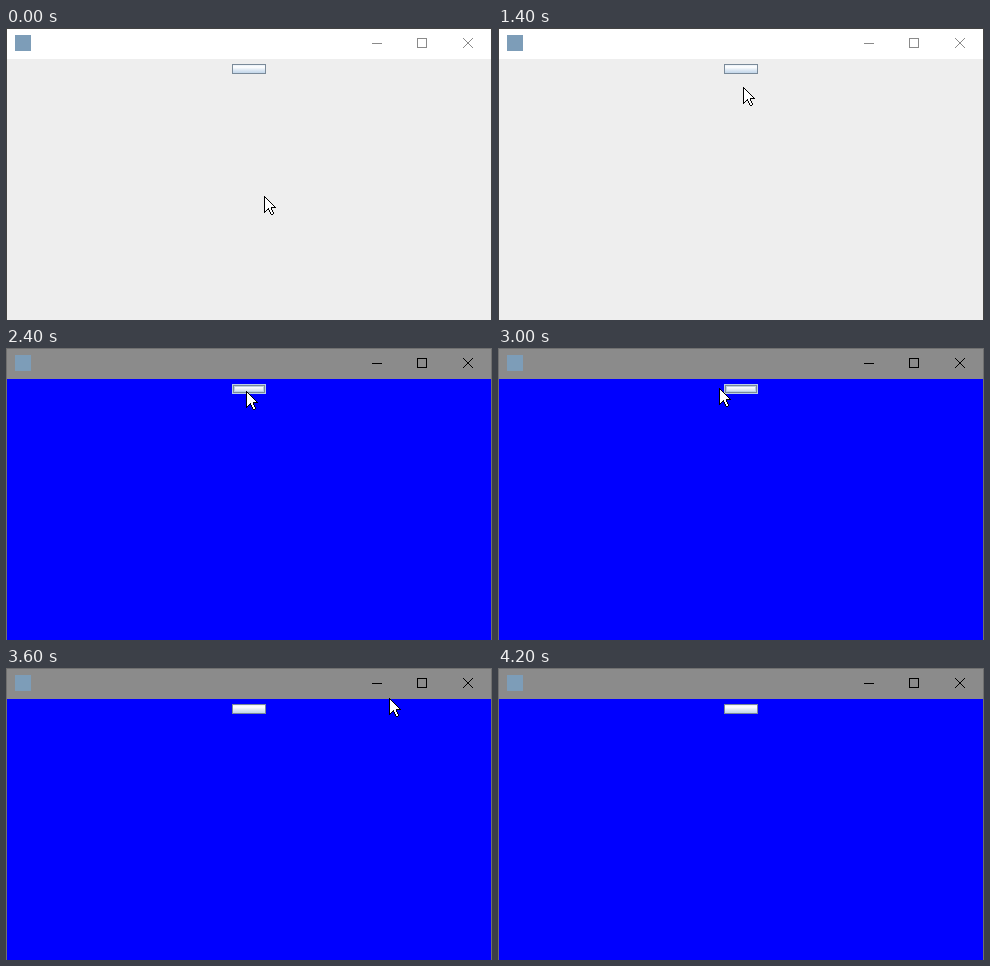
An HTML page with a canvas for the animation above (4.4 s loop, 486x292 px).

```html
<!DOCTYPE html>
<html lang="en">
<head>
<meta charset="utf-8">
<title>Button demo</title>
<style>
html, body { margin: 0; width: 100%; height: 100%; overflow: hidden; }
canvas { display: block; width: 486px; height: 292px; }
</style>
</head>
<body>
<canvas id="stage" width="486" height="292"></canvas>
<script>
const ctx = document.getElementById('stage').getContext('2d');
const LOOP = 4400;

// Pointer positions: start time, tip x, tip y
const POINTER = [
  [0, 258, 168], [1000, 250, 136], [1200, 247, 88], [1400, 245, 59],
  [1600, 242, 48], [1800, 240, 43], [3000, 221, 40], [3200, 212, 40],
  [3400, 297, 37], [3600, 383, 30], [3800, 291, 132], [4000, 166, 271]
];

function rect(x, y, w, h, color) {
  ctx.fillStyle = color;
  ctx.fillRect(x, y, w, h);
}

function frame(x, y, w, h, color) {
  ctx.strokeStyle = color;
  ctx.lineWidth = 1;
  ctx.strokeRect(x + 0.5, y + 0.5, w - 1, h - 1);
}

function drawWindow(clicked) {
  rect(0, 0, 486, 292, clicked ? '#707070' : '#434343');
  rect(1, 1, 484, 30, clicked ? '#8b8b8b' : '#ffffff');
  rect(1, 31, 484, 261, clicked ? '#0000ff' : '#eeeeee');
  rect(9, 7, 16, 16, '#7d9db8');

  const ink = clicked ? '#000000' : '#8a8a8a';
  rect(366, 15, 10, 1, ink);
  frame(411, 10, 10, 10, ink);
  ctx.beginPath();
  ctx.moveTo(457, 10);
  ctx.lineTo(467, 20);
  ctx.moveTo(467, 10);
  ctx.lineTo(457, 20);
  ctx.stroke();
}

function drawButton(hover) {
  const x = 226, y = 36, w = 34, h = 10;
  const g = ctx.createLinearGradient(0, y, 0, y + h);
  g.addColorStop(0, '#dde8f3');
  g.addColorStop(0.3, '#ffffff');
  g.addColorStop(0.6, '#dde8f3');
  g.addColorStop(1, '#b8cfe5');
  rect(x, y, w, h, g);
  if (hover) {
    frame(x, y, w, h, '#b8cfe5');
    frame(x + 2, y + 2, w - 4, h - 4, '#b8cfe5');
    frame(x + 1, y + 1, w - 2, h - 2, '#7a8a99');
  } else {
    frame(x, y, w, h, '#7a8a99');
  }
}

function drawPointer(px, py) {
  const span = (x, y, w) => {
    rect(px + x, py + y, w, 1, '#000000');
    if (w > 2) rect(px + x + 1, py + y, w - 2, 1, '#ffffff');
  };
  for (let y = 0; y < 11; y++) span(0, y, y + 1);
  span(0, 11, 8);
  rect(px + 7, py + 11, 5, 1, '#000000');
  for (let y = 12; y < 17; y++) span(0, y, 17 - y);
  for (let y = 12; y < 18; y++) span((y >> 1) - 2, y, 4);
  span(7, 18, 2);
}

function draw(now) {
  const t = now % LOOP;
  drawWindow(t >= 2400);
  drawButton(t >= 1800 && t < 3200);
  if (t < 4200) {
    const [, x, y] = POINTER.filter(p => p[0] <= t).pop();
    drawPointer(x, y);
  }
}

const start = performance.now();
function tick() {
  draw(performance.now() - start);
  requestAnimationFrame(tick);
}
tick();
</script>
</body>
</html>
```
